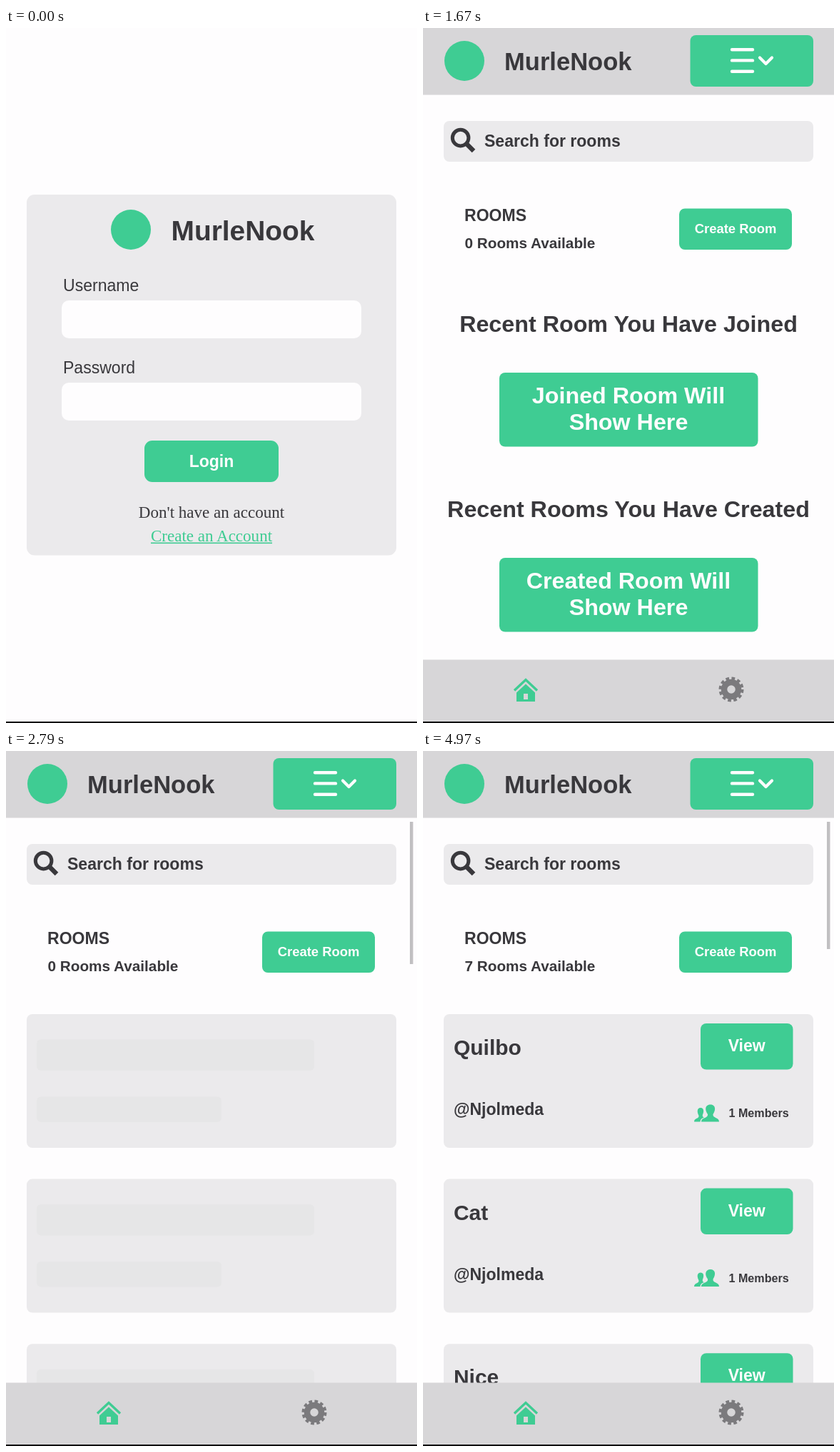
Animation of 576 by 972 pixels, one loop 5 s. Source, as an HTML page:

```html
<!DOCTYPE html>
<html lang="en">
<head>
<meta charset="utf-8">
<title>Room list</title>
<style>
  html, body { margin: 0; width: 100%; height: 100%; overflow: hidden; background: #fefdfe; }
  svg { display: block; width: 576px; height: 972px; }
  text { font-family: "Liberation Sans", Arial, sans-serif; font-weight: bold; fill: #39383c; white-space: pre; }
  .plain { font-weight: normal; }
  .serif { font-family: "Liberation Serif", serif; font-weight: normal; }
  .tip { font-family: "Open Sans", sans-serif; }
</style>
</head>
<body>
<svg id="stage" viewBox="0 0 576 972"></svg>
<script>
const GREEN = '#3fcc93', PANEL = '#ebeaec', BAR = '#d7d6d8', PAPER = '#fefdfe', INK = '#39383c';
const BASE = 23.04, LOOP = 5000, CARD_STEP = 230.6;

const box = (x, y, w, h, fill, r = 8) =>
  `<rect x="${x}" y="${y}" width="${w}" height="${h}" rx="${r}" fill="${fill}"/>`;
const text = (x, y, str, size = BASE, extra = '') =>
  `<text x="${x}" y="${y}" font-size="${size}" ${extra}>${str}</text>`;
const mid = (x, y, str, size = BASE, extra = '') =>
  text(x, y, str, size, `text-anchor="middle" ${extra}`);
const white = `style="fill:${PAPER}"`;
const line = (d, color, width, extra = '') =>
  `<path d="${d}" fill="none" stroke="${color}" stroke-width="${width}" ${extra}/>`;
const group = (id, content) => `<g id="${id}">${content}</g>`;
const logo = (x, y) => `<circle cx="${x}" cy="${y}" r="28" fill="${GREEN}"/>`;
const round = 'stroke-linecap="round" stroke-linejoin="round"';

const login =
  box(29, 233, 518, 504.5, PANEL, 11) + logo(175, 282) + text(231.5, 296.5, 'MurleNook', 38.9) +
  text(80, 368, 'Username', BASE, 'class="plain"') + box(78, 381, 420, 53, PAPER, 10) +
  text(80, 483, 'Password', BASE, 'class="plain"') + box(78, 496, 420, 53, PAPER, 10) +
  box(194, 577, 188, 58, GREEN, 11) + mid(288, 614, 'Login', BASE, white) +
  mid(288, 685, "Don't have an account", BASE, 'class="serif"') +
  mid(288, 718, 'Create an Account', BASE, `class="serif" style="fill:${GREEN}"`) +
  box(203, 719.5, 170, 1.6, GREEN, 0);

const header =
  box(0, 0, 576, 93.5, BAR, 0) + logo(58, 46) + text(114, 58.8, 'MurleNook', 34.56) +
  box(374.5, 10, 172.5, 72, GREEN) +
  line('M433 30.2H462M433 45.4H462M433 60.7H462', PAPER, 4.4, round) +
  line('M472 41.5L480.5 50L489 41.5', PAPER, 4.2, round);

const search =
  box(29, 130, 518, 57, PANEL) +
  `<circle cx="52.6" cy="153.6" r="11.3" fill="none" stroke="${INK}" stroke-width="5"/>` +
  line('M60.5 161.5L71 172', INK, 6.5) + text(86, 166, 'Search for rooms') +
  text(58, 270, 'ROOMS') + text(58.5, 308, '<tspan id="count">0</tspan> Rooms Available', 20.74) +
  box(359, 252.5, 158, 57.5, GREEN) + mid(438, 287, 'Create Room', 18.43, white);

const recent = (y, title, label) =>
  mid(288, y, title, 32.26) + box(107, y + 57, 362.5, 103.5, GREEN) +
  mid(288, y + 100.3, label, 32.26, white) + mid(288, y + 137, 'Show Here', 32.26, white);
const empty =
  recent(425, 'Recent Room You Have Joined', 'Joined Room Will') +
  recent(684, 'Recent Rooms You Have Created', 'Created Room Will');

const cards = content => [0, 1, 2].map(i =>
  `<g transform="translate(0 ${i * CARD_STEP})">${content(i)}</g>`).join('');
const people =
  `<path fill="${GREEN}" d="M390 518.5C390 512 400 514 399 508C394 501 396 494.5 402.8 494.5
    S411 501 406.500 508C405.500 514 415 512 415 518.5Z
    M380 518.5C380 513 387 514.500 386.500 510C383 503 385 499 389 499S394.500 503 391.800 509
    C391.500 512 393 512 394 512.500Q388.500 514 388.500 518.5Z"/>`;
const rooms = i =>
  text(43, 425, ['Quilbo', 'Cat', 'Nice'][i], 29.95) +
  box(389, 381, 129.5, 64.5, GREEN) + mid(453.7, 420, 'View', BASE, white) +
  text(43, 509, '@Njolmeda') + people + text(428.5, 512, '1 Members', 16.13);

const footer =
  box(0, 883.5, 576, 87, BAR, 0) +
  line('M128 926.5L144 911.5L160 926.5', GREEN, 3.4) +
  `<path fill="${GREEN}" d="M131 929.5L144 917.5L157 929.5V942H131Z"/>` + box(141, 931, 6, 8, BAR, 0) +
  '<g fill="none" stroke="#7b7a7d"><circle cx="432" cy="925" r="10" stroke-width="8.5"/>' +
  '<circle cx="432" cy="925" r="15" stroke-width="5" stroke-dasharray="4.5 3.354"/></g>';

const tooltip =
  '<g style="filter:drop-shadow(0 1px 2px #0006)"><path fill="#fff" d="M7 12H19L30 1.500L41 12H143' +
  'Q147 12 147 16V46Q147 50 143 50H7Q3 50 3 46V16Q3 12 7 12Z"/></g>' +
  text(15.5, 37, 'html', 18.5, 'class="tip" style="fill:#800b80"') +
  text(76, 37, '400 × 0', 17, 'class="tip plain" style="fill:#737375" word-spacing="-1.5"');

const stage = document.getElementById('stage');
stage.innerHTML =
  box(0, 0, 576, 972, PAPER, 0) + group('login', login) +
  group('home', search + group('empty', empty) +
    group('list', cards(() => box(29, 368, 518, 187, PANEL)) +
      group('skeleton', cards(() => box(43, 403.5, 389, 43.5, '#e0e0e0', 6) + box(43, 483.5, 259, 35.5, '#e0e0e0', 6))) +
      group('rooms', cards(rooms)) +
      '<rect id="thumb" x="566" y="99" width="4.5" fill="#c1c0c2"/>') +
    header + footer + group('tooltip', tooltip)) +
  box(0, 970, 576, 2, '#000', 0);

const el = id => document.getElementById(id);
const show = (id, on) => el(id).style.display = on ? '' : 'none';
const HOME = 1600, LOADING = 1700, LOADED = 4090, PULSE = 1500;

function draw(now) {
  const t = now % LOOP, loaded = t >= LOADED;
  show('login', t < HOME);
  show('home', t >= HOME);
  show('empty', t < LOADING);
  show('list', t >= LOADING);
  show('skeleton', !loaded);
  show('rooms', loaded);
  show('tooltip', t >= 4120 && t < 4350);
  el('count').textContent = loaded ? 7 : 0;
  el('thumb').setAttribute('height', loaded ? 178 : 199);
  // the placeholders fade out and back once, then hold
  const phase = Math.min(Math.max((t - LOADING) / PULSE, 0), 1);
  el('skeleton').style.opacity = (1 + Math.cos(2 * Math.PI * phase)) / 2;
}

const start = performance.now();
function tick() {
  draw(performance.now() - start);
  requestAnimationFrame(tick);
}
tick();
</script>
</body>
</html>
```
